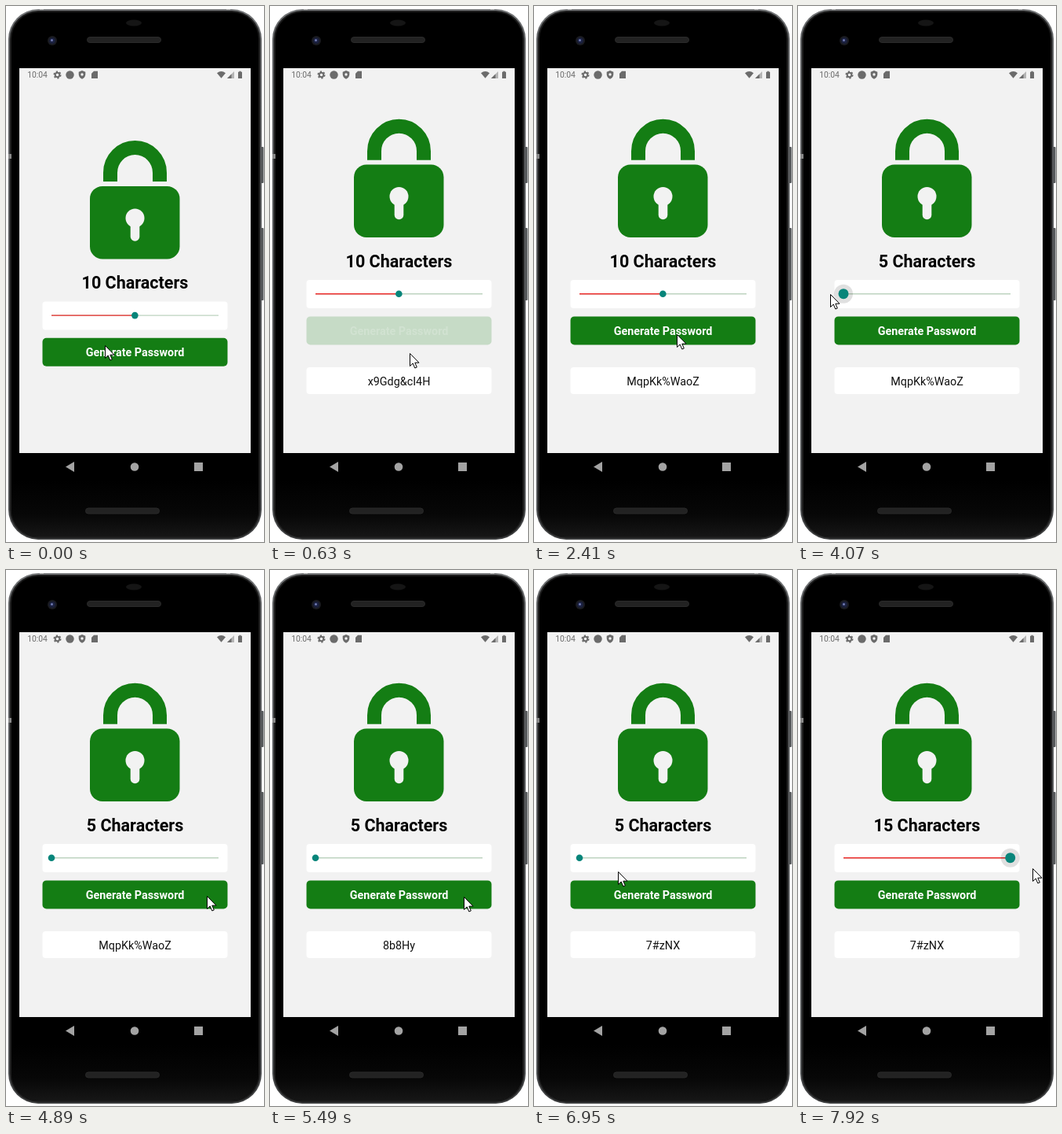
Write an HTML page that moves like this. It is 329 by 681 pixels and loops after 8 s.

```html
<!DOCTYPE html>
<html lang="en">
<head>
<meta charset="utf-8">
<title>Password generator</title>
<style>
  html, body { margin: 0; width: 100%; height: 100%; overflow: hidden; background: #fff; }
  svg { display: block; width: 100vw; height: 100vh; font-family: Roboto, sans-serif; }
  text { text-anchor: middle; }
</style>
</head>
<body>
<svg viewBox="0 0 329 681">
  <defs>
    <linearGradient id="rim" x1="0" x2="0" y1="0" y2="1">
      <stop offset="0" stop-color="#77797b"/>
      <stop offset=".06" stop-color="#5c5e60"/>
      <stop offset=".94" stop-color="#4a4c4e"/>
      <stop offset="1" stop-color="#3a3b3c"/>
    </linearGradient>
    <linearGradient id="chin" x1="0" x2="0" y1="0" y2="1">
      <stop offset="0" stop-color="#000"/>
      <stop offset=".6" stop-color="#070707"/>
      <stop offset="1" stop-color="#161616"/>
    </linearGradient>
  </defs>

  <!-- phone -->
  <g fill="#55585a">
    <rect x="324" y="179" width="4.5" height="46" rx="1"/>
    <rect x="324" y="282" width="4.5" height="92" rx="1"/>
  </g>
  <rect x="3" y="4" width="323" height="674" rx="38" fill="url(#rim)"/>
  <rect x="5" y="6" width="319" height="670" rx="36" fill="#1c1c1c"/>
  <rect x="7" y="8" width="315" height="666" rx="34"/>
  <path d="M7 603H322V640A34 34 0 0 1 288 674H41A34 34 0 0 1 7 640Z" fill="url(#chin)"/>
  <path d="M3 188h4v6h-4z" fill="#888"/>
  <path d="M43 4.500h5M281 4.500h5" stroke="#aaa"/>
  <ellipse cx="163" cy="21.5" rx="10" ry="4" fill="#151515"/>
  <circle cx="59" cy="44" r="6" fill="#1a1b20"/>
  <circle cx="59" cy="44" r="3.800" fill="#1b2140"/>
  <circle cx="58.500" cy="43.500" r="1.500" fill="#6f78b0"/>
  <g fill="#222" stroke="#2a2a2a">
    <rect x="103.500" y="39.500" width="94" height="7" rx="3.500"/>
    <rect x="101.500" y="638" width="94" height="7" rx="3.500"/>
  </g>
  <rect x="17" y="79" width="295" height="489" fill="#f2f2f2"/>
  <g fill="#a3a3a3">
    <path d="M76 585.5L87 579V592Z"/>
    <circle cx="164" cy="585.5" r="5.300"/>
    <rect x="240" y="580" width="11" height="11"/>
  </g>

  <!-- status bar -->
  <g fill="#6b6b6b">
    <text x="40" y="91.200" font-size="10.300">10:04</text>
    <circle cx="65.500" cy="87.500" r="2.800" fill="none" stroke="#6b6b6b" stroke-width="2"/>
    <circle cx="65.500" cy="87.500" r="4.300" fill="none" stroke="#6b6b6b" stroke-width="1.500" stroke-dasharray="2.250"/>
    <circle cx="81.500" cy="87.500" r="5.200"/>
    <path d="M97 82L101.300 83.800V87Q101 91 97 92.800Q93 91 92.700 87V83.800Z"/>
    <circle cx="97" cy="87" r="1.700" fill="#f2f2f2"/>
    <path d="M112 82.800H117V92H109V85.800Z"/>
    <path d="M269 85.200Q274.500 80.800 280 85.200L274.500 91.800Z"/>
    <path d="M282 92L291 83V92Z" opacity=".45"/>
    <path d="M282 92L287.500 86.500V92Z"/>
    <path d="M296 83.700H297.400V82.700H299.600V83.700H301V92H296Z"/>
  </g>

  <!-- app -->
  <g id="app">
    <path d="M133 195.700V184.500A31.500 31.800 0 0 1 196 184.500V195.700" fill="none" stroke="#147d14" stroke-width="18"/>
    <rect x="107" y="201.500" width="114.500" height="92.500" rx="16" fill="#147d14"/>
    <circle cx="164.500" cy="242" r="12" fill="#f2f2f2"/>
    <path d="M164.500 243V265.500" stroke="#f2f2f2" stroke-width="11.600" stroke-linecap="round"/>
    <text id="title" x="164.500" y="331.600" font-size="21.530" font-weight="700"></text>
    <rect x="46.500" y="348" width="236" height="36" rx="4" fill="#fff"/>
    <path d="M58 365.700H271" stroke="#bdd3bf" stroke-width="1.400"/>
    <path id="fill" stroke="#ee2c2c" stroke-width="1.400"/>
    <circle id="ring" cy="365.700" r="12" fill-opacity=".12"/>
    <circle id="thumb" cy="365.700" fill="#07857a"/>
    <g id="button">
      <rect x="46.500" y="394.400" width="236" height="36" rx="5" fill="#147d14"/>
      <text x="164.500" y="418" font-size="14.350" font-weight="700" fill="#fff">Generate Password</text>
    </g>
  </g>
  <g id="result">
    <rect x="46.500" y="459" width="236" height="34" rx="4" fill="#fff"/>
    <text id="password" x="164.500" y="481.500" font-size="14.350" fill="#111"></text>
  </g>
  <path id="cursor" d="M.5 .5V16.500L4.200 13L6.800 19L9.300 18L6.800 12.200H12Z" fill="#fff" stroke="#000"/>
</svg>
<script>
const LOOP = 8000, MIN = 5, MAX = 15, LEFT = 58, STEP = 21.27;
const el = id => document.getElementById(id);
const clamp = (v, lo, hi) => Math.min(hi, Math.max(lo, v));

// time, x, y of the pointer tip
const path = [
  [0, 126, 431], [45, 126, 431], [210, 178, 441], [1200, 178, 441],
  [1360, 157, 420], [1530, 193, 384], [1680, 222, 381], [1990, 182, 417],
  [2440, 182, 417], [2850, 229, 346], [2900, 229, 346], [3270, 162, 362],
  [3580, 162, 362], [4040, 41, 366], [4240, 41, 366], [4850, 256, 414],
  [5430, 256, 414], [5490, 247, 415], [5760, 247, 415], [5930, 282, 419],
  [6060, 282, 419], [6170, 216, 418], [6560, 216, 418], [7140, 55, 366],
  [7260, 55, 365], [7410, 55, 365], [7900, 299, 379], [LOOP, 299, 379]
];

// each tap: finger down, finger up, end of fade, new password
const taps = [
  [570, 630, 690, 'x9Gdg&cI4H'],
  [2120, 2200, 2400, 'MqpKk%WaoZ'],
  [4930, 5010, 5300, '8b8Hy'],
  [5690, 5750, 5930, 'vVxYm'],
  [6350, 6430, 6680, '7#zNX']
];

// each drag: press, release, value before
const drags = [[3550, 4210, 10], [7410, LOOP, 5]];

function pointer(t) {
  const i = path.findIndex(p => p[0] > t);
  const [t0, x0, y0] = path[i - 1], [t1, x1, y1] = path[i];
  const k = (t - t0) / (t1 - t0);
  return [x0 + (x1 - x0) * k, y0 + (y1 - y0) * k];
}

function slider(t, x) {
  const drag = drags.find(d => t < d[1]);
  if (t < drag[0]) return [drag[2], false];
  return [clamp(Math.round(MIN + (x + 2 - LEFT) / STEP), MIN, MAX), true];
}

function opacity(t) {
  const tap = taps.find(p => t >= p[0] && t < p[2]);
  if (!tap) return 1;
  const k = clamp((t - tap[1]) / (tap[2] - tap[1]), 0, 1);
  return 0.2 + 0.8 * k * k * (3 - 2 * k);
}

function draw(t) {
  const [x, y] = pointer(t);
  const [value, held] = slider(t, x);
  const pos = LEFT + (value - MIN) * STEP;
  const done = taps.filter(p => t >= p[1]);

  el('cursor').setAttribute('transform', `translate(${Math.round(x)} ${Math.round(y)})`);
  el('app').setAttribute('transform', `translate(0 ${done.length ? 0 : 27.4})`);
  el('title').textContent = `${value} Characters`;
  el('fill').setAttribute('d', `M${LEFT} 365.7H${pos}`);
  el('ring').setAttribute('cx', pos);
  el('ring').setAttribute('visibility', held ? 'visible' : 'hidden');
  el('thumb').setAttribute('cx', pos);
  el('thumb').setAttribute('r', held ? 6.5 : 4.3);
  // label and background fade separately, so the label blends into the button
  el('button').setAttribute('fill-opacity', opacity(t));
  el('result').setAttribute('visibility', done.length ? 'visible' : 'hidden');
  el('password').textContent = done.length ? done[done.length - 1][3] : '';
}

const start = performance.now();
function tick() {
  draw((performance.now() - start) % LOOP);
  requestAnimationFrame(tick);
}
tick();
</script>
</body>
</html>
```
